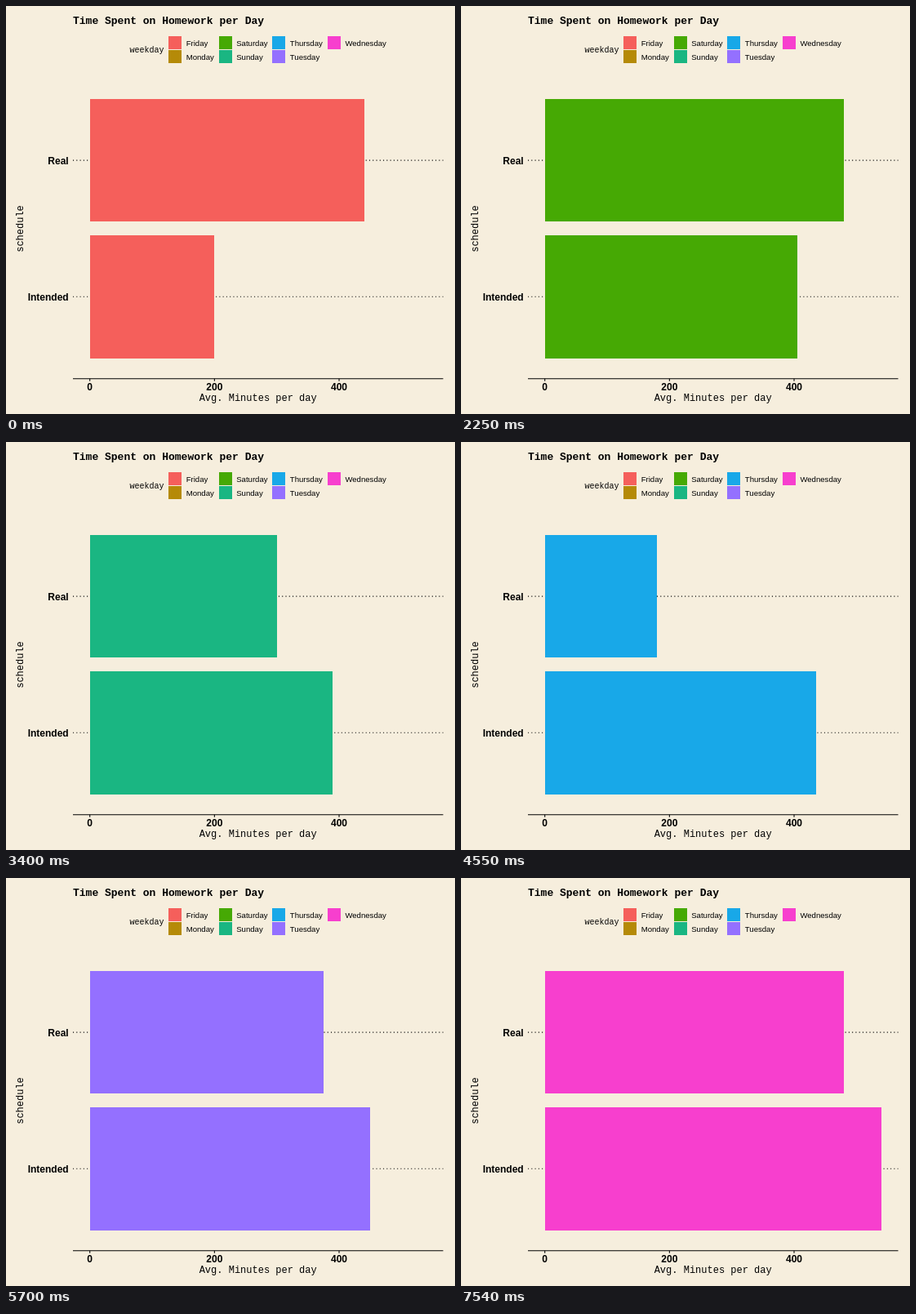
An HTML page that plays this animation: 550x500 px, repeating every 8000 ms.

```html
<!DOCTYPE html>
<html lang="en">
<head>
<meta charset="utf-8">
<title>Time Spent on Homework per Day</title>
<style>
  html, body { margin: 0; height: 100%; overflow: hidden; background: #f6eedd; }
  svg { display: block; }
  rect { shape-rendering: crispEdges; }
  .mono { font: 12px "Liberation Mono", "Courier New", monospace; }
  .title { font-size: 13px; font-weight: bold; }
  .small { font-size: 10px; }
  .axis { font: bold 12px "Liberation Sans", Arial, sans-serif; }
  .key { font: 9.6px "Liberation Sans", Arial, sans-serif; }
  .line { stroke: #000; stroke-width: 1.07; }
  .dotted { stroke-dasharray: 1.07 3.2; }
  .middle { text-anchor: middle; }
  .end { text-anchor: end; }
</style>
</head>
<body>
<svg id="chart" width="550" height="500" viewBox="0 0 550 500"></svg>
<script>
const chart = document.getElementById("chart");

// Weekday, colour, real minutes, intended minutes
const days = [
  ["Friday", "#f55f5b", 440, 200],
  ["Monday", "#b58a08", 270, 405],
  ["Saturday", "#46a904", 480, 405],
  ["Sunday", "#1ab682", 300, 390],
  ["Thursday", "#18a8e8", 180, 435],
  ["Tuesday", "#9470ff", 375, 450],
  ["Wednesday", "#f73fce", 480, 540],
];
const keyX = [199, 261, 326, 394];
const labelX = [220.7, 282.2, 347.8, 415.4];
const scaleX = minutes => 102.7 + minutes * 0.7633;

function add(tag, attributes, text = "") {
  const node = document.createElementNS("http://www.w3.org/2000/svg", tag);
  for (const name in attributes) node.setAttribute(name, attributes[name]);
  node.textContent = text;
  return chart.appendChild(node);
}
const label = (x, y, text, style, more) => add("text", { x, y, class: style, ...more }, text);
const line = (x1, y1, x2, y2, style = "") => add("line", { x1, y1, x2, y2, class: "line " + style });

label(82, 22, "Time Spent on Homework per Day", "mono title");
label(151.5, 57, "weekday", "mono small");
days.forEach(([name, fill], i) => {
  const column = i >> 1, row = i % 2;
  add("rect", { x: keyX[column], y: 37 + 17 * row, width: 16, height: 16, fill });
  label(labelX[column], 49 + 17.2 * row, name, "key");
});

line(82, 189.1, 535.5, 189.1, "dotted");
line(82, 356.3, 535.5, 356.3, "dotted");
const bars = [
  add("rect", { x: 103, y: 114, height: 150 }),
  add("rect", { x: 103, y: 281, height: 151 }),
];
label(76.7, 193.5, "Real", "axis end");
label(76.7, 360.7, "Intended", "axis end");

line(82, 456.7, 535.5, 456.7);
for (const minutes of [0, 200, 400]) {
  const x = scaleX(minutes);
  line(x, 456.7, x, 459.8);
  label(x, 471, minutes, "axis middle");
}
label(308.7, 484, "Avg. Minutes per day", "mono middle");
label(0, 0, "schedule", "mono middle", { transform: "translate(21 273) rotate(-90)" });

function draw(now) {
  // The first day is 50 ms shorter than the others.
  const [, fill, ...minutes] = days[Math.floor((now % 8000 + 50) / 1150)];
  bars.forEach((bar, i) => {
    bar.setAttribute("fill", fill);
    bar.setAttribute("width", Math.round(scaleX(minutes[i])) - 103);
  });
}

const start = performance.now();
function tick() {
  draw(performance.now() - start);
  requestAnimationFrame(tick);
}
tick();
</script>
</body>
</html>
```
